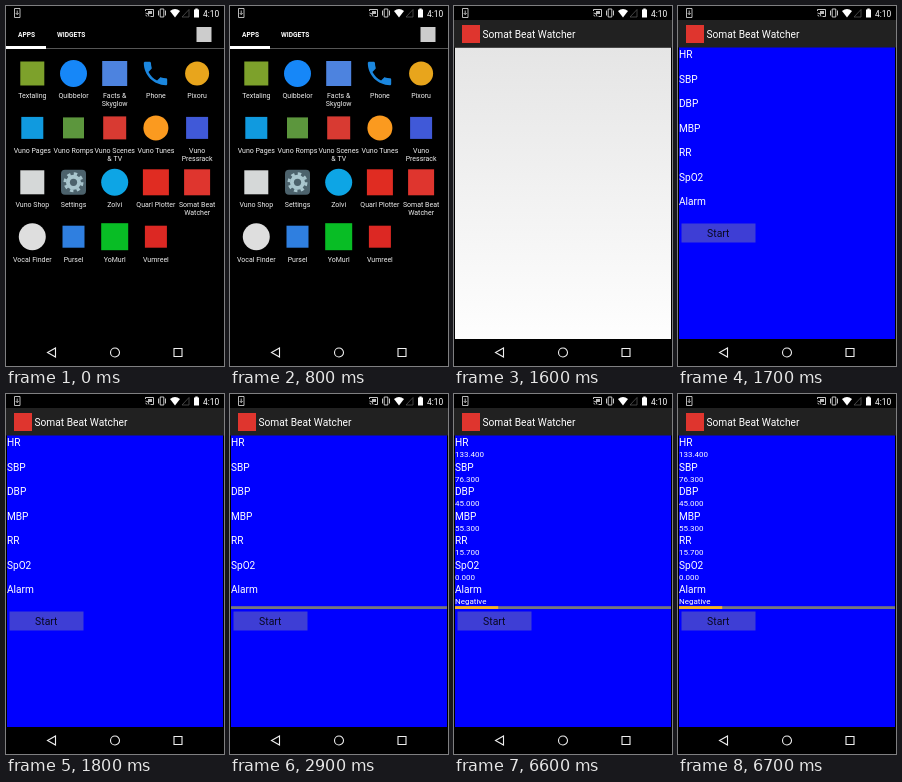
Animation of 218x360 px, one loop 8000 ms. Source, as an HTML page with a canvas:

```html
<!DOCTYPE html>
<html lang="en">
<head>
<meta charset="utf-8">
<title>Phone app launch</title>
<style>
html, body { margin: 0; width: 100%; height: 100%; overflow: hidden; background: #000; }
canvas { display: block; width: 218px; height: 360px; }
</style>
</head>
<body>
<canvas id="stage"></canvas>
<script>
const LOOP = 8000, W = 218, H = 360;
const canvas = document.getElementById('stage');
const dpr = window.devicePixelRatio || 1;
canvas.width = W * dpr;
canvas.height = H * dpr;
const c = canvas.getContext('2d');
const APP = 'Somat Beat Watcher';
const TAPPED = 14;

// label (| breaks the line), shape, colour, size
const apps = [
  ['Textaling', 'square', '#7da12b', 24], ['Quibbelor', 'circle', '#1687f8', 27],
  ['Facts &|Skyglow', 'square', '#4d83df', 25], ['Phone', 'phone', '#1b87df'],
  ['Pixoru', 'circle', '#e8a51c', 24],
  ['Vuno Pages', 'square', '#109adf', 22], ['Vuno Romps', 'square', '#5c963d', 21],
  ['Vuno Scenes|& TV', 'square', '#d83a32', 23], ['Vuno Tunes', 'circle', '#fb9a1f', 25],
  ['Vuno|Pressrack', 'square', '#4059d8', 22],
  ['Vuno Shop', 'square', '#d5d8d8', 24], ['Settings', 'gear', '#4c626c'],
  ['Zolvi', 'circle', '#0da5e5', 27], ['Quarl Plotter', 'square', '#e02c22', 26],
  ['Somat Beat|Watcher', 'square', '#df352e', 26],
  ['Vocal Finder', 'circle', '#dedede', 27], ['Pursel', 'square', '#2f7fe0', 22],
  ['YoMurl', 'square', '#08bd25', 27], ['Vumreel', 'square', '#dc2823', 22]
];
const labels = ['HR', 'SBP', 'DBP', 'MBP', 'RR', 'SpO2', 'Alarm'];
const readings = [
  { at: 4400, progress: .1, values: ['131.900', '74.800', '43.700', '54.100', '13.100', '0.000', 'Negative'] },
  { at: 6600, progress: .2, values: ['133.400', '76.300', '45.000', '55.300', '15.700', '0.000', 'Negative'] }
];
const handset = new Path2D('M6.6 10.8c1.4 2.8 3.8 5.1 6.6 6.6l2.2-2.2c.3-.3.7-.4 1-.2 1.1.4 2.3.6 3.6.6.5 0 1 .4 1 1V20c0 .5-.5 1-1 1C10.6 21 3 13.4 3 4c0-.5.5-1 1-1h3.5c.5 0 1 .5 1 1 0 1.2.2 2.4.6 3.6.1.3 0 .7-.3 1z');

function rect(x, y, w, h, color) {
  c.fillStyle = color;
  c.fillRect(x, y, w, h);
}
function disc(x, y, r, color) {
  c.fillStyle = color;
  c.beginPath();
  c.arc(x, y, r, 0, 7);
  c.fill();
}
function text(s, x, y, size, color = '#fff', align = 'left', weight = 400) {
  c.font = `${weight} ${size}px Roboto, sans-serif`;
  c.textAlign = align;
  c.fillStyle = color;
  c.fillText(s, x, y);
}
function line(d, color = '#ddd', width = 1) {
  c.strokeStyle = color;
  c.lineWidth = width;
  c.stroke(new Path2D(d));
}
function shape(d, color) {
  c.fillStyle = color;
  c.fill(new Path2D(d));
}

function drawIcon(kind, color, size, x, y) {
  if (kind === 'circle') disc(x, y, size / 2, color);
  else if (kind === 'square') rect(x - size / 2, y - size / 2, size, size, color);
  else if (kind === 'phone') {
    c.save();
    c.translate(x - 16, y - 15.6);
    c.scale(1.3, 1.3);
    c.fillStyle = color;
    c.fill(handset);
    c.restore();
  } else {
    c.fillStyle = color;
    c.beginPath();
    c.roundRect(x - 12.5, y - 12.5, 25, 25, 4);
    c.fill();
    c.strokeStyle = '#a9c6ce';
    c.lineWidth = 3;
    c.setLineDash([3.4, 3.28]);
    c.beginPath();
    c.arc(x, y, 8.5, 0, Math.PI * 2);
    c.stroke();
    c.setLineDash([]);
    disc(x, y, 7.5, '#a9c6ce');
    disc(x, y, 3.6, color);
  }
}

function drawLauncher(pressed) {
  text('APPS', 12, 31.3, 6.6, '#fff', 'left', 700);
  text('WIDGETS', 51, 31.3, 6.6, '#fff', 'left', 700);
  rect(0, 42, W, 1, '#555');
  rect(0, 40, 40, 3, '#fff');
  rect(190.5, 21, 15, 15, '#ccc');
  apps.forEach(([label, kind, color, size], i) => {
    const x = 26.3 + i % 5 * 41.2, y = 67.5 + Math.floor(i / 5) * 54.4;
    c.globalAlpha = pressed && i === TAPPED ? .45 : 1;
    drawIcon(kind, color, size, x, y);
    label.split('|').forEach((part, k) => text(part, x, y + 24.8 + k * 8, 7, '#eee', 'center'));
  });
  c.globalAlpha = 1;
}

function drawActionBar() {
  rect(0, 14, W, 27.5, '#212121');
  rect(8, 19, 18, 18, '#df352e');
  text(APP, 28.5, 31.8, 10.2);
}

// Blank starting window, grown from the tapped icon's cell
function drawStarting(p) {
  const mix = (a, b) => a + (b - a) * p;
  c.save();
  c.globalAlpha = p < 1 ? Math.min(1, .3 + p * .72) : 1;
  c.translate(mix(171, 0), mix(162, 14));
  c.scale(mix(41, W) / W, mix(51, 319) / 319);
  c.translate(0, -14);
  const g = c.createLinearGradient(0, 41, 0, 333);
  g.addColorStop(0, '#e5e5e5');
  g.addColorStop(1, '#fefefe');
  rect(1, 41.5, W - 2, 291.5, g);
  drawActionBar();
  c.restore();
}

function drawMonitor(t) {
  rect(1, 41, W - 2, 292, '#0000ff');
  drawActionBar();
  const reading = readings.filter(r => t >= r.at).pop();
  labels.forEach((label, i) => {
    const y = 52 + i * 24.5;
    text(label, 1, y, 10.1);
    if (reading) text(reading.values[i], 1, y + 11.4, 8);
  });
  if (t >= 2500) {
    rect(1, 212.2, W - 2, 2.8, '#77777c');
    if (reading) rect(1, 212.2, (W - 2) * reading.progress, 2.8, '#f5b325');
  }
  rect(3.5, 217.5, 74, 19, t >= 2500 && t < 2900 ? '#6464dc' : '#3e3ed5');
  text('Start', 40.3, 231, 10.4, '#080820', 'center');
}

function drawSystemBars() {
  line('M8.5 2.5h5.5v9h-5.5zM11.2 4.5v4M9.7 7l1.5 1.6L12.7 7', '#ccc', .9);
  line('M139.5 5v-1.5h8v7h-3M139.5 7a3.5 3.5 0 0 1 3.5 3.5M139.5 9.2a1.5 1.5 0 0 1 1.4 1.3', '#ddd', .9);
  rect(142, 5, 4, 3, '#bbb');
  line('M154.2 3h3.6v8h-3.6zM152.5 4.5v5M159.5 4.5v5', '#ddd', .9);
  shape('M164 5q5-4 10 0l-5 6.5z', '#fff');
  line('M183 3.5v7.5h-7z', '#555', .8);
  shape('M188 3.5h1.3v-1h2.4v1h1.3v8h-5z', '#fff');
  text('4:10', 197, 10.5, 8.4);
  line('M49.5 342v9l-8-4.5z', '#eee', 1.1);
  line('M113.5 346.5a4.5 4.5 0 1 1-9 0a4.5 4.5 0 1 1 9 0z', '#eee', 1.1);
  line('M168 342.5h8v8h-8z', '#eee', 1.1);
}

function growth(t) {
  if (t < 1200) return 0;
  return [.1, .44, .85][(t - 1200) / 100] || 1;
}

function draw(now) {
  const t = Math.floor(now % LOOP / 100) * 100;
  c.setTransform(dpr, 0, 0, dpr, 0, 0);
  rect(0, 0, W, H, '#000');
  const p = growth(t);
  if (p < 1) drawLauncher(t >= 1000);
  if (t >= 1700) drawMonitor(t);
  else if (p > 0) drawStarting(p);
  drawSystemBars();
}

const start = performance.now();
function tick() {
  draw(performance.now() - start);
  requestAnimationFrame(tick);
}
tick();
</script>
</body>
</html>
```
